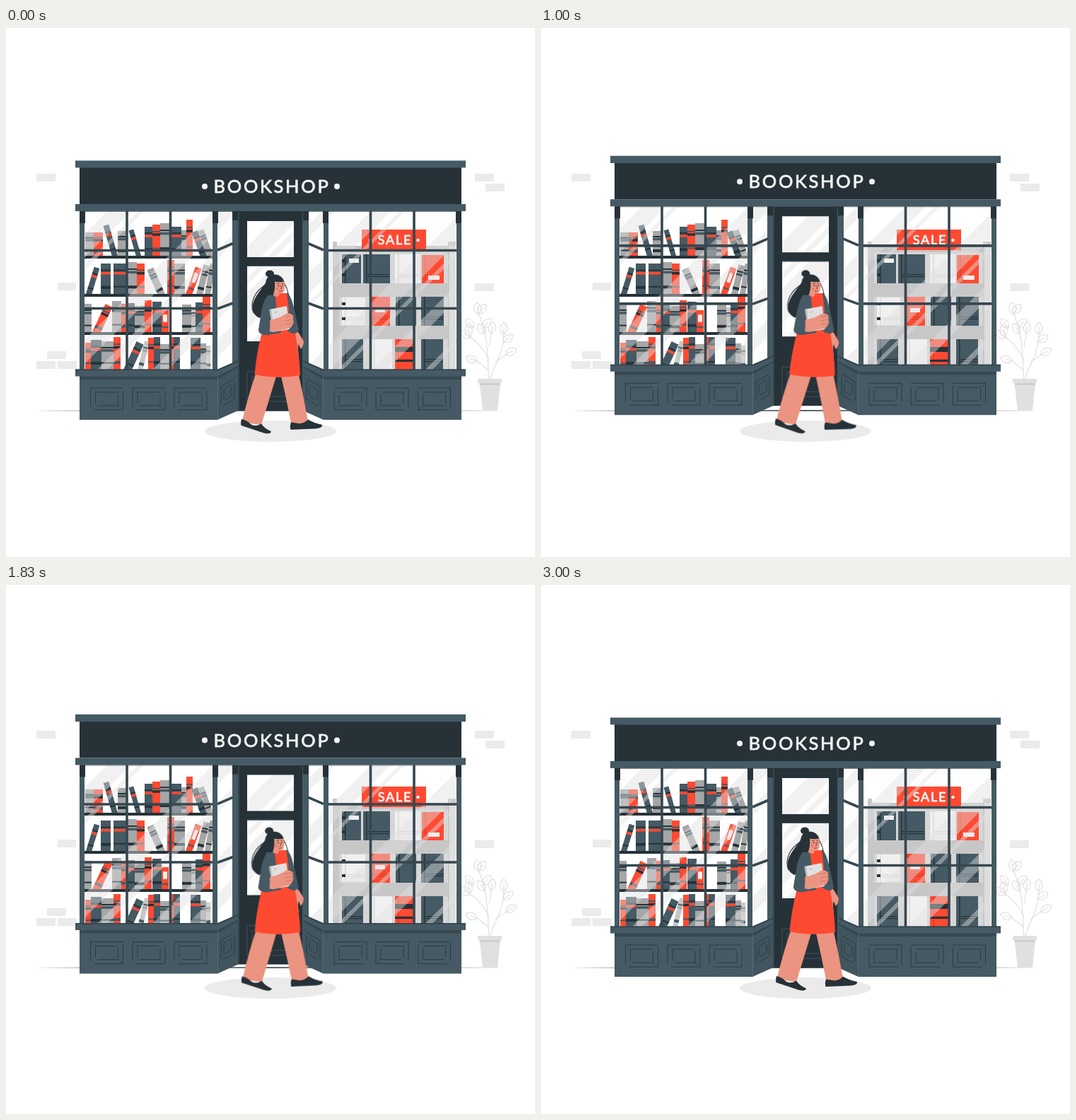
An HTML page that plays this animation: 748x748 px, repeating every 3.04 s.

```html
<!DOCTYPE html>
<html lang="en">
<head>
<meta charset="utf-8">
<title>Bookshop</title>
<style>
  html, body { margin: 0; width: 100%; height: 100%; overflow: hidden; background: #fff; }
  svg { display: block; width: 100%; height: 100%; }
  text { font-family: Lato, "Open Sans", sans-serif; font-weight: 400; text-anchor: middle; fill: #f5f5f5; stroke: #f5f5f5; stroke-width: .8; stroke-linejoin: round; }
  .dark { fill: #263238; }
  .slate { fill: #455a64; }
  .red { fill: #ff4a32; }
  .skin { fill: #eb9481; }
  .line { fill: none; stroke: #263238; }
  /* 24 poses a second, 3 s of motion, then a 40 ms hold */
  #store { animation: float 3040ms -4ms infinite; }
  #woman { transform-origin: 390px 458px; animation: sway 3040ms -4ms infinite; }
  @keyframes float {
    0%, 49.342% { transform: translateY(0); animation-timing-function: steps(18); }
    24.671%, 74.013% { transform: translateY(-10px); animation-timing-function: steps(18); }
    98.684%, 100% { transform: translateY(0); }
  }
  @keyframes sway {
    0% { transform: rotate(0deg); animation-timing-function: steps(18); }
    24.671% { transform: rotate(1deg); animation-timing-function: steps(36); }
    74.013% { transform: rotate(-1deg); animation-timing-function: steps(18); }
    98.684%, 100% { transform: rotate(0deg); }
  }
</style>
</head>
<body>
<svg viewBox="0 0 748 748">
  <defs>
    <clipPath id="leftPane"><path d="M111 259H292V483H111zM299 259H320V474L299 486z"/></clipPath>
    <clipPath id="rightPane"><path d="M456 259H637V483H456zM449 259H428V474L449 486z"/></clipPath>
    <clipPath id="doorPane"><path d="M341 273H407V324H341zM341 337H407V443H341z"/></clipPath>
    <g id="panel" class="line" stroke-width="1">
      <path d="M0 27V0H46M46 4V31H5M7 22V6H38M39 9V25H10" stroke-opacity=".75"/>
      <path d="M0 0L7 6M46 31L39 25" stroke-opacity=".3"/>
    </g>
    <g id="wing">
      <path class="slate" d="M104 259h7v224h-7zM292 259h7v224h-7zM320 259h8v216h-8z"/>
      <path class="dark" d="M104 259h8v17h-8zM292 259h8v17h-8zM320 259h8v13h-8z"/>
      <path d="M111 314.500H292M111 396.500H292M171 259V483M232.500 259V483M299 314L321 304.500M299 397L321 389" fill="none" stroke="#37474f" stroke-width="3.600"/>
      <path class="slate" d="M104 492H299L328 476V541L299 554H104z"/>
      <path class="dark" d="M299 492L328 475V541L299 554z" opacity=".12"/>
      <path class="dark" d="M104 492H299L328 475V480L299 497H104z" opacity=".45"/>
      <path class="slate" d="M98 482.500H299L328 470V478L299 492.500H98z"/>
      <path class="dark" d="M98 482.500H299V484H98zM299 483L328 470V472L299 485z" opacity=".6"/>
      <path d="M299.500 493V554" stroke="#607078" stroke-width=".8"/>
      <use href="#panel" x="119.500" y="509"/>
      <use href="#panel" x="179" y="509"/>
      <use href="#panel" x="238" y="509"/>
      <path class="line" d="M304 533V507L323 496M323 500V525L307 534M308 525V511L319 504M319 507V520L310 526" stroke-opacity=".75"/>
    </g>
  </defs>

  <rect width="748" height="748" fill="#fff"/>
  <path fill="#ebebeb" d="M43 206h27v11H43zM73 360h26v11H73zM58 457h27v11H58zM43 471h27v11H43zM73 471h27v11H73zM663 206h27v11h-27zM678 220h27v11h-27zM663 361h27v11h-27z"/>
  <path class="dark" d="M37 541Q374 539.600 711 541Q374 542.400 37 541z"/>

  <g id="plant" fill="none" stroke="#e0e0e0" stroke-width="1.200">
    <path d="M683 496C680 468 684 445 669 405M685 496C688 478 702 468 704 432M683 470Q676 452 657 437M682 484Q676 478 666 471M683 450Q686 440 686 430M692 473Q700 466 708 462"/>
  </g>
  <path fill="#e0e0e0" d="M667 496H701V502H699L695 541H674L669.500 502H667z"/>
  <path fill="#cfcfcf" d="M669.500 502H699L698.600 505H670z"/>

  <g id="books"></g>

  <g id="shelf">
    <path fill="#c7c7c7" d="M462 302H468V308H625V302H636V483H462z"/>
    <path fill="#d6d6d6" d="M471 317H625V361H471zM471 380H625V421H471zM471 440H625V483H471z"/>
    <path fill="#dedede" d="M627 308H636V483H627z"/>
    <g id="covers"></g>
    <rect class="red" x="503" y="285" width="91" height="29"/>
    <text x="550" y="306" font-size="18" letter-spacing="1.800">SALE</text>
    <circle cx="515" cy="300" r="2.300" fill="#f5f5f5"/>
    <circle cx="582.500" cy="300" r="2.300" fill="#f5f5f5"/>
  </g>

  <g id="store">
    <g id="glass" fill="#e0e0e0" fill-opacity=".45"></g>
    <path class="dark" fill-rule="evenodd" d="M328 259H420V541H328zM341 273V324H407V273zM341 337V443H407V337z"/>
    <path d="M329 260V541M419.500 260V541M341 336.500H407" fill="none" stroke="#455a64" stroke-width="1"/>
    <path d="M341 486H407V528H341zM348 493H400V521H348z" fill="none" stroke="#455a64" stroke-width=".8"/>
    <use href="#wing"/>
    <use href="#wing" transform="matrix(-1 0 0 1 748 0)"/>
    <path class="dark" d="M104 197H644V249H104z"/>
    <path class="slate" d="M98 187.400H650V197.600H98zM98 249H650V259H98z"/>
    <path class="dark" d="M104 259H644V260H104z" opacity=".6"/>
    <text x="376" y="233" font-size="25.500" letter-spacing="2.700">BOOKSHOP</text>
    <circle cx="281" cy="224" r="4" fill="#f5f5f5"/>
    <circle cx="468" cy="224" r="4" fill="#f5f5f5"/>
  </g>

  <ellipse cx="374" cy="570" rx="93" ry="15" fill="#ebebeb"/>

  <g id="woman">
    <path class="dark" d="M371 353C366 366 350 378 348.500 394Q348 405 358 410Q371 406 379 388L386 362z"/>
    <path class="line" d="M367 363C352 372 344 388 350 403M393 360C399 370 402 382 399.500 396" stroke-width="1.100"/>
    <path class="skin" d="M388 488L413 486Q421 522 427 556Q415 562 403 558Q396 522 388 488zM354 486H384Q372 526 361 561Q346 560 334 555Q343 518 354 486z"/>
    <path class="dark" d="M333 553Q331.500 558 332.500 562L364 572.500Q374 575 375 570.500Q365 566 361 559.500Q354 564 347 561Q340 554 333 553z"/>
    <path class="dark" d="M403 557.500Q401 563 402.500 568L438 566.500Q448 565.500 447 561Q436 559 427 553.500Q421 560 413 559z"/>
    <path class="skin" d="M402 424C408 426 412 428 415 433L421 443Q421 449 417 454Q415 451 414 447Q412 455 408 452L405 440z"/>
    <path d="M408 444L412 443L414 466L410 465z" fill="#b5b5b5"/>
    <path class="red" d="M379 375H398L403 410L409 432Q415 462 416 491Q384 497 351.500 490Q354 460 362 430L374 426z"/>
    <path class="slate" d="M378 373C368 376 364 386 361 402L357 427Q358 434 369 434L389 431L383 398L380 376zM397 374C403 378 406 390 409 404L414 427L410 432Q402 432 398 428L400 398z"/>
    <path class="line" d="M374 398Q374 412 371 418M403 403L406 423" stroke-width=".8"/>
    <path d="M372.500 398L397 393L401 426L377 430z" fill="#e0e0e0"/>
    <path d="M372.500 398L375 397.500L379 429.500L377 430z" fill="#b8b8b8"/>
    <path d="M380 402L383 401.500" stroke="#999" stroke-width="1"/>
    <path class="skin" d="M372 414Q380 411 387 409L396 404Q403 402 406 407L406.500 417Q405 424 398 425L386 428Q377 431 371 429z"/>
    <path d="M394 409L404 407M395 414L406 412M396 419L405 418" fill="none" stroke="#c9705f" stroke-width=".8"/>
    <path class="slate" d="M361 405L373 412Q374 424 372 434Q359 435 357 428z"/>
    <path class="skin" d="M378 357L392 354Q395 364 393.500 371Q391 377 386 375.500L386 379Q382 381 378 378z"/>
    <path class="dark" d="M367.500 364C366 354 372 348.500 380.500 348.500Q390 349 393.500 358.500Q386 360 380 358.500Q381 368 378 377Q371 380 367.500 374z"/>
    <ellipse class="dark" cx="373" cy="347.500" rx="6" ry="5"/>
    <ellipse class="red" cx="383.500" cy="369" rx="2" ry="1.500" opacity=".45"/>
    <path class="line" d="M383 362Q385 360.500 386.500 361.500M389.500 361.500L392 361M388.500 364L390 368L388 368.500M386 372Q388.500 373 390.500 371" stroke-width=".7"/>
    <circle class="dark" cx="385.500" cy="364.500" r=".9"/>
    <circle class="dark" cx="391" cy="364" r=".8"/>
  </g>
</svg>
<script>
  const $ = id => document.getElementById(id);
  const ink = { s: '#455a64', d: '#263238', g: '#a6a6a6', l: '#c7c7c7', r: '#ff4a32', w: '#f0f0f0' };
  const rect = (x, y, w, h, fill) => `<rect x="${x}" y="${y}" width="${w}" height="${h}" fill="${fill}"/>`;

  // Each book: left, width, height, colour, lean in degrees
  const rows = [
    [322, '112 12 33 g,124 13 33 r,150 8 46 s -16,158 13 35 g,184 7 39 s -16,196 11 41 s,207 11 44 r,218 13 46 g,231 17 41 s,248 8 36 g,255 9 51 r,275 9 38 s -20,285 8 40 g -20'],
    [376, '113 8 40 s 17,134 14 43 s,152 19 43 s,172 13 45 g,185 11 43 r,215 10 41 g -24,228 10 48 r,238 15 43 g,254 9 41 r 20,269 9 43 g 14,281 8 44 g 10'],
    [430, '111 10 40 g,122 11 44 r 25,150 13 44 g,163 6 40 r,171 11 41 s,182 14 37 g,196 10 45 r,207 13 43 s,220 10 31 r,249 13 39 g,262 6 35 l,268 10 42 s,278 11 50 r'],
    [483, '112 8 38 r,120 15 42 s,135 17 40 g,152 10 46 r,166 11 44 s 25,186 7 42 l 14,201 8 45 r,209 9 46 s,218 13 36 g,234 12 46 r,237 9 46 s,261 14 45 s,275 8 37 g,283 6 34 l']
  ];
  const trim = { s: 'dr', r: 'sd', g: 'ds', l: 'sg' };

  function book(base, spec, i) {
    const [x, w, h, c, lean = 0] = spec.split(' ');
    const [a, b] = trim[c];
    const y = base - h;
    const label = c === 'r' && i % 3 === 2
      ? rect(+x + 2, y + h * .2, w - 4, h * .34, ink.w)
      : rect(x, y + h * .2, w, 2, ink[a]) + rect(x, y + h * .28, w, 3.5, ink[b]);
    const foot = rect(x, y + h * .74, w, i % 2 ? 4 : 2, ink[a]);
    return `<g transform="rotate(${lean} ${lean < 0 ? +x + +w : x} ${base})">${rect(x, y, w, h, ink[c])}${label}${foot}</g>`;
  }

  $('books').innerHTML = rows.map(([base, list]) =>
    list.split(',').map((spec, i) => book(base, spec, i)).join('') +
    (base < 480 ? rect(111, base, 181, 4, ink.d) : '')).join('');

  // Display copies: left, top, width, height, colour
  const covers = '475 320 27 41 s,505 320 38 41 s,550 320 36 41 w,588 321 31 40 r,' +
    '475 381 33 39 w,514 380 29 41 r,551 380 29 41 s,587 380 32 41 s,' +
    '475 440 30 43 s,516 440 30 43 w,550 440 28 43 r,587 440 31 43 s';
  const label = (x, y, w = 14) => rect(x, y, w, 6, ink.w);
  $('covers').innerHTML = covers.split(',').map((spec, i) => {
    const [x, y, w, h, c] = spec.split(' ');
    const edge = c === 'w' ? '#d9d9d9' : c === 'r' ? '#d93d29' : ink.d;
    const marks = i % 3 ? rect(+x + 6, +y + 28, w - 7, 1.2, edge) + rect(+x + 6, +y + 31, w - 7, 1.2, edge) : '';
    return rect(x, y, w, h, ink[c]) + rect(+x + 4, y, 1.5, h, edge) + marks;
  }).join('') + label(485, 326) + label(597, 350, 16) + label(522, 396) +
    rect(550, 451, 28, 7, ink.d) + rect(550, 469, 28, 3, ink.d) +
    [327, 347, 388, 409].map(y => rect(475, y, 5, 4, ink.d)).join('');

  // Diagonal reflections: pairs of x + y start and width
  const band = (c, w) => `<path d="M${c - 259} 259h${w}l-224 224h${-w}z"/>`;
  const pane = (id, list) => `<g clip-path="url(#${id})">${list.map(b => band(...b)).join('')}</g>`;
  $('glass').innerHTML =
    pane('leftPane', [[402, 34], [446, 8], [552, 34], [612, 14], [690, 22], [740, 24]]) +
    pane('rightPane', [[706, 18], [775, 28], [816, 7], [905, 36], [952, 8], [1000, 22], [1076, 10]]) +
    pane('doorPane', [[650, 34], [694, 10], [716, 50], [790, 26], [826, 8]]);

  // Leaves: tip position and direction
  const leaves = [[668, 405, -8], [668, 404, 38], [661, 424, -40], [657, 438, -55], [675, 424, 40], [656, 436, -12],
    [686, 432, 10], [666, 471, -70], [704, 433, 0], [703, 444, 55], [707, 462, 60], [677, 432, -35]];
  $('plant').innerHTML += leaves.map(([x, y, a]) =>
    `<path transform="translate(${x} ${y}) rotate(${a})" d="M0 0C-8 -5 -6 -12 0 -17C6 -12 7 -5 0 0V-11"/>`).join('');
</script>
</body>
</html>
```
